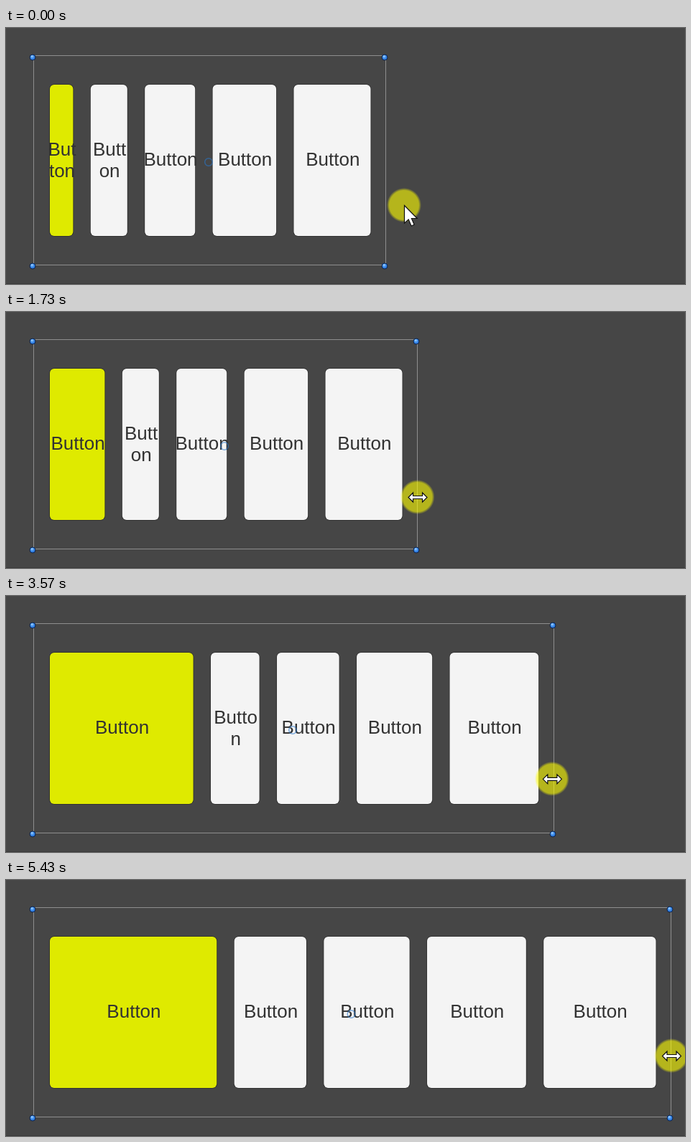
An HTML page with a canvas for the animation above (5930 ms loop, 945 by 357 pixels).

```html
<!DOCTYPE html>
<html lang="en">
<head>
<meta charset="utf-8">
<title>Layout resize</title>
<style>
  html, body { margin: 0; width: 100%; height: 100%; overflow: hidden; background: #464646; }
  canvas { display: block; }
</style>
</head>
<body>
<canvas id="stage" width="945" height="357"></canvas>
<script>
const ctx = document.getElementById('stage').getContext('2d');
const LOOP = 5930, FRAME = 1000 / 30;
const LEFT = 61, TOP = 79, HEIGHT = 211, GAP = 24.4;
const PREFERRED = 183, FIXED = [51, 70, 88.5, 107];
const LABEL = 'Button', FONT = '26px "Liberation Sans", Arial, sans-serif';

// time, right edge of the panel, pointer x, pointer y
const KEYS = [
  [0, 529, 554, 247], [160, 529, 554, 247], [350, 529, 540, 253], [530, 529, 528.5, 258],
  [700, 529, 528.5, 258], [900, 529, 529, 255.5], [967, 531, 531, 255], [1270, 545.5, 544, 256],
  [1733, 573, 572.5, 258], [1870, 588, 587, 259], [2267, 619, 616.5, 259.5],
  [2470, 637, 635, 260], [2967, 681, 679.5, 259.3], [3070, 689, 687, 259],
  [3670, 778, 775, 254], [4100, 845, 841.5, 248], [4270, 873, 870.5, 247],
  [4600, 911, 909.5, 246], [4833, 924, 923.5, 245], [4933, 926, 926, 245]
];

function poseAt(t) {
  const next = KEYS.findIndex(k => k[0] > t);
  if (next < 0) return KEYS[KEYS.length - 1].slice(1);
  const a = KEYS[next - 1], b = KEYS[next], p = (t - a[0]) / (b[0] - a[0]);
  return [1, 2, 3].map(i => a[i] + (b[i] - a[i]) * p);
}

function circle(x, y, r) {
  ctx.beginPath();
  ctx.arc(x, y, r, 0, Math.PI * 2);
}

function polygon(x, y, points, scale = 1) {
  ctx.beginPath();
  points.forEach(([px, py]) => ctx.lineTo(x + px * scale, y + py * scale));
  ctx.closePath();
  ctx.fillStyle = '#fff';
  ctx.strokeStyle = '#111';
  ctx.lineWidth = 1.2;
  ctx.lineJoin = 'miter';
  ctx.fill();
  ctx.stroke();
}

// Breaks between letters; the text box is slightly wider than its button.
function wrap(width) {
  const lines = [''];
  for (const letter of LABEL) {
    const last = lines.length - 1;
    if (lines[last] && ctx.measureText(lines[last] + letter).width > width + 7) lines.push(letter);
    else lines[last] += letter;
  }
  return lines;
}

function drawButton(x, width, color) {
  ctx.beginPath();
  ctx.roundRect(x, TOP, width, HEIGHT, 6);
  ctx.fillStyle = color;
  ctx.strokeStyle = 'rgba(25,25,25,.55)';
  ctx.lineWidth = 1.6;
  ctx.stroke();
  ctx.fill();

  ctx.font = FONT;
  ctx.textAlign = 'center';
  ctx.fillStyle = '#323232';
  ctx.filter = 'blur(.45px)';
  const lines = wrap(width);
  const first = lines.length > 1 ? 193 - (lines.length - 1) * 15 : 192;
  lines.forEach((line, i) => ctx.fillText(line, x + width / 2 + 0.8, first + i * 30));
  ctx.filter = 'none';
}

function drawButtons(right) {
  const free = right - 82.5 - 4 * GAP - FIXED.reduce((a, b) => a + b);
  const extra = Math.max(0, free - PREFERRED) / 5;
  const widths = [Math.min(free, PREFERRED), ...FIXED].map(w => w + extra);
  let x = LEFT;
  widths.forEach((w, i) => {
    drawButton(x, w, i ? '#f4f4f4' : '#dfea00');
    x += w + GAP;
  });
}

function drawHandle(x, y) {
  const shade = ctx.createRadialGradient(x - 1, y - 2, 0, x, y, 4.5);
  shade.addColorStop(0, '#b4dcff');
  shade.addColorStop(0.5, '#3f90ee');
  shade.addColorStop(1, '#1a5cc4');
  circle(x, y, 4);
  ctx.fillStyle = shade;
  ctx.fill();
  ctx.strokeStyle = '#10264c';
  ctx.lineWidth = 1;
  ctx.stroke();
}

function drawPanel(right) {
  const edge = Math.round(right);
  ctx.strokeStyle = '#8e8e8e';
  ctx.lineWidth = 1;
  ctx.strokeRect(38.5, 38.5, edge - 39, 292);
  for (const x of [37, edge - 2]) for (const y of [41, 332]) drawHandle(x, y);
  circle((35 + edge) / 2, 187, 5.3);
  ctx.strokeStyle = 'rgba(40,120,205,.6)';
  ctx.lineWidth = 1.5;
  ctx.stroke();
}

function ringSize(t) {
  if (t >= 840 && t < 1010) return Math.min(1, (t - 830) / 135);
  if (t >= 4890 && t < 5425) return t < 4925 ? 0.6 : 1;
  return 0;
}

function drawPointer(x, y, t) {
  const glow = ctx.createRadialGradient(x, y, 0, x, y, 24);
  glow.addColorStop(0, 'rgba(255,255,0,.6)');
  glow.addColorStop(0.85, 'rgba(255,255,0,.6)');
  glow.addColorStop(1, 'rgba(255,255,0,0)');
  circle(x, y, 24);
  ctx.fillStyle = glow;
  ctx.fill();

  const size = ringSize(t);
  if (size) {
    circle(x - 1, y, 18.5 * size);
    ctx.strokeStyle = 'rgba(224,112,10,.9)';
    ctx.lineWidth = 5;
    ctx.stroke();
  }

  if (x > 534 && t < 600) {
    polygon(x + 0.5, y + 0.5, [[0, 0], [0, 16.5], [3.8, 13], [6.4, 19], [9.1, 17.8], [6.6, 12], [11.8, 12]], 1.5);
  } else {
    const half = [[-13, 0], [-6.5, -6.5], [-6.5, -2], [6.5, -2], [6.5, -6.5]];
    polygon(x + 0.5, y + 0.5, [...half, ...half.map(([px, py]) => [-px, -py])]);
  }
}

function draw(now) {
  const time = now % LOOP;
  const t = Math.floor((time + 3.4) / FRAME) * FRAME;
  const [right, x, y] = poseAt(t);
  ctx.fillStyle = '#464646';
  ctx.fillRect(0, 0, 945, 357);
  ctx.fillStyle = '#3a3a3a';
  ctx.fillRect(0, 356, 945, 1);
  drawButtons(right);
  drawPanel(right);
  drawPointer(x, y, t);
}

const start = performance.now();
function tick() {
  draw(performance.now() - start);
  requestAnimationFrame(tick);
}
tick();
</script>
</body>
</html>
```
